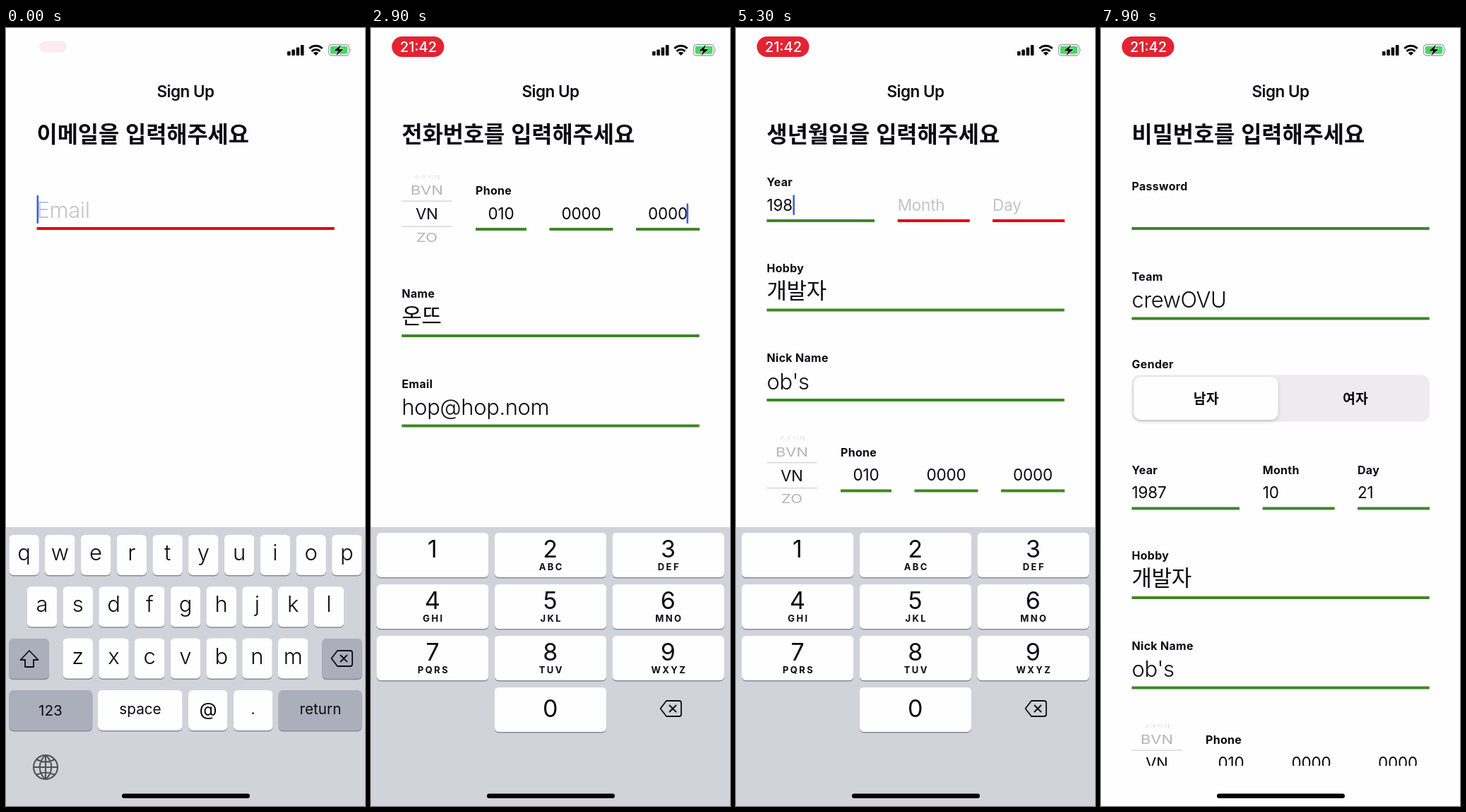
These frames come from a looping animation (508 px wide and 1102 px high, 8 s). An HTML page:

```html
<!DOCTYPE html>
<html lang="ko">
<head>
<meta charset="utf-8">
<title>Sign Up</title>
<style>
  html, body { margin: 0; width: 100%; height: 100%; overflow: hidden; background: #fefdff; }
  svg { display: block; width: 100vw; height: 100vh; }
  text { font-family: Inter, 'Noto Sans CJK KR', sans-serif; fill: #0c0b10; white-space: pre; }
  .mid { text-anchor: middle; }
  .nav { font-size: 22.5px; font-weight: 600; letter-spacing: -.5px; }
  .title { font: 700 31.7px 'Noto Sans CJK KR', sans-serif; }
  .label { font-size: 16px; font-weight: 700; letter-spacing: .3px; }
  .big { font-size: 31px; font-weight: 300; letter-spacing: -.4px; }
  .small { font-size: 22.5px; letter-spacing: -.2px; }
  .hint { fill: #c5c3c9; }
  .wheel { font-size: 22px; }
  .segment { font-size: 19.5px; font-weight: 600; }
  .key { font-size: 31px; font-weight: 300; }
  .pop { font-size: 44px; font-weight: 300; }
  .word { font-size: 20.7px; }
  .at { font-size: 26px; }
  .digit { font-size: 34px; }
  .abc { font-size: 13px; font-weight: 700; letter-spacing: 2.4px; }
  .clock { font-size: 20px; font-weight: 500; fill: #fff; }
  .icon { fill: none; stroke: #0c0b10; stroke-width: 1.8; stroke-linejoin: round; stroke-linecap: round; }
  .tool { fill: none; stroke: #50525a; stroke-width: 2.1; stroke-linecap: round; }
</style>
</head>
<body>
<svg viewBox="0 0 508 1102" preserveAspectRatio="none">
  <defs>
    <clipPath id="page"><rect width="508" height="1045"/></clipPath>
    <filter id="lift" x="-20%" y="-20%" width="140%" height="150%">
      <feDropShadow dx="0" dy="2" stdDeviation="2.5" flood-opacity=".2"/>
    </filter>
  </defs>
  <rect width="508" height="1102" fill="#fefdff"/>
  <g id="status">
    <g fill="#0c0b10">
      <rect x="398" y="33" width="4.6" height="6" rx="1"/>
      <rect x="404.3" y="30.5" width="4.6" height="8.5" rx="1"/>
      <rect x="410.6" y="27.5" width="4.6" height="11.5" rx="1"/>
      <rect x="416.9" y="24" width="4.6" height="15" rx="1"/>
      <path d="M438.5 39 l-3.8 -3.8 a5.4 5.4 0 0 1 7.6 0z"/>
    </g>
    <path d="M432.5 33 a8.5 8.5 0 0 1 12 0 M429.3 29 a13 13 0 0 1 18.4 0" fill="none" stroke="#0c0b10" stroke-width="3"/>
    <rect x="456.5" y="23.5" width="29" height="15.5" rx="4.5" fill="none" stroke="#a3a2a8" stroke-width="1.3"/>
    <rect x="458.7" y="25.7" width="24.6" height="11" rx="2.6" fill="#43d964"/>
    <path d="M487 28.5 q2 2.7 0 5.4z" fill="#a3a2a8"/>
    <path d="M474 23.5 L464 32.5 h6 L467 39.5 L477.5 30 h-6z" fill="#0c0b10" stroke="#fefdff" stroke-width="1" paint-order="stroke"/>
    <text class="nav mid" x="254" y="98">Sign Up</text>
  </g>
  <g id="scene"></g>
  <rect x="164" y="1084.5" width="181" height="6.5" rx="3.2" fill="#050406"/>
</svg>
<script>
const LOOP = 8000, TICK = 100, MOVE = 240, KEYBOARD_HEIGHT = 395;
const RED = '#e4000f', GREEN = '#3f8824', WHITE = '#fefdff', GREY = '#abafbc';

const clamp = (v, lo, hi) => Math.min(hi, Math.max(lo, v));
const ease = v => 1 - (1 - clamp(v, 0, 1)) ** 3;
const prefixes = s => [...s].map((_, i) => s.slice(0, i + 1));
const latest = (list, t) => list.filter(e => e[0] <= t).pop()[1];

// Each step adds a row on top; from `start` one state of `values` shows per tick.
const step = (at, title, label, height, start, values, keys = '') =>
  ({ at, title, label, height, start, values, keys });
const steps = [
  step(-1000, '이메일을', 'Email', 127.5, 100, [...prefixes('hop@hop.'), 'hop@hop.no', 'hop@hop.nom'], 'hop@hop.om'),
  step(1100, '이름을', 'Name', 127.5, 1200, ['오', '온', '온ㄸ', '온뜨'], ' ㄴㄷㅡ'),
  step(1600, '전화번호를', 'Phone', 152, 2100,
    ['0', '01', '010', '01000', '0100000', '010000000', '01000000000'], '0100000'),
  step(3000, '닉네임을', 'Nick Name', 127.5, 3300, ['o', 'ob', 'ob', "ob'", "ob's"], "ob 's"),
  step(3900, '취미를', 'Hobby', 127.5, 4200, ['ㄱ', '개', '갭', '개바', '개발', '개발ㅈ', '개발자'], 'ㄱㅐㅂㅏㄹㅈㅏ'),
  step(4900, '생년월일을', 'Year', 115.5, 5100, ['1', '19', '198', '198', '1987', '198710', '19871021'], '198 701'),
  step(5800, '성별을', 'Gender', 152.5, 5800, ['']),
  step(6000, '소속을', 'Team', 127.5, 6400, prefixes('crewOVU'), 'crewOVU'),
  step(7300, '비밀번호를', 'Password', 127.5, 7500, [' '])
];
const boards = [[0, 'email'], [1100, 'en'], [1200, 'ko'], [1600, 'pad'], [3000, 'ko'], [3200, 'en'],
  [3500, 'sym'], [3600, 'en'], [4100, 'ko'], [4900, 'pad'], [6000, 'en'], [6700, 'EN'], [7000, 'en']];
const letters = {
  en: ['qwertyuiop', 'asdfghjkl', 'zxcvbnm'],
  EN: ['QWERTYUIOP', 'ASDFGHJKL', 'ZXCVBNM'],
  ko: ['ㅂㅈㄷㄱㅅㅛㅕㅑㅐㅔ', 'ㅁㄴㅇㄹㅎㅗㅓㅏㅣ', 'ㅋㅌㅊㅍㅠㅜㅡ'],
  sym: ['1234567890', '-/:;()$&@"', ".,?!'"]
};

const text = (x, y, str, cls, attrs = '') =>
  `<text x="${x}" y="${y}" class="${cls}" ${attrs}>${str.replace('&', '&amp;')}</text>`;
const rect = (x, y, w, h, fill, rx = 0, attrs = '') =>
  `<rect x="${x}" y="${y}" width="${w}" height="${h}" rx="${rx}" fill="${fill}" ${attrs}/>`;
const cap = (x, y, w, h, fill) => rect(x, y + 1.5, w, h, '#898b92', 6) + rect(x, y, w, h, fill, 6);
const path = (d, cls, attrs = '') => `<path d="${d}" class="${cls}" ${attrs}/>`;

function valueAt(row, t) {
  const i = Math.round((t - row.start) / TICK);
  return i < 0 ? '' : row.values[Math.min(i, row.values.length - 1)];
}

function pressedKey(row, t) {
  return (t / TICK) % 2 ? row.keys[Math.round((t - row.start) / TICK) + 1] || '' : '';
}

function field(x0, x1, lineY, value, hint, focused, size = 'big', centred = false) {
  const shown = value || hint;
  const x = centred ? (x0 + x1) / 2 : x0;
  const drop = size === 'small' ? 14.5 : /[ㄱ-힣]/.test(value) ? 17 : 15.5;
  const cls = `${size}${centred ? ' mid' : ''}${value ? '' : ' hint'}`;
  const [top, tall] = size === 'big' ? [47, 40] : [36.5, 28.5];
  return rect(x0, lineY - 2, x1 - x0, 4, value ? GREEN : RED) +
    text(x, lineY - drop, shown, cls, focused ? 'id="focus"' : '') +
    (focused ? rect(x0, lineY - top, 2.6, tall, '#3c62d6', 1, 'id="caret"') : '');
}

function wheel(t) {
  const turn = 2 * ease((t - 2640) / 300);
  const items = ['선택', 'BVN', 'VN', 'ZO'].map((name, i) => {
    const d = i - turn, angle = .66 * d;
    if (Math.abs(d) > 2.1) return '';
    const place = `transform="translate(79 ${263 + 54 * Math.sin(angle)}) scale(1 ${Math.cos(angle)})"`;
    const opacity = Math.abs(d) < .5 ? 1 : Math.abs(d) < 1.5 ? .3 : .1;
    return text(0, 8, name, 'wheel mid', `${place} opacity="${opacity}"`);
  });
  return items.join('') + rect(43.5, 244.5, 71.5, 1.3, '#d3d2d7') + rect(43.5, 280.5, 71.5, 1.3, '#d3d2d7');
}

function rowBody(row, t, active) {
  const v = valueAt(row, t), n = v.length;
  const label = (x, y, str, on) => on ? text(x, y, str, 'label') : '';
  if (row.label === 'Phone') {
    const part = n < 3 ? 0 : n < 7 ? 1 : 2;
    return wheel(t) + label(148, 236, 'Phone', n) +
      field(148, 220, 285, v.slice(0, 3), 'Phone', active && part === 0, 'small', true) +
      field(252.5, 342.5, 285, v.slice(3, 7), '', active && part === 1, 'small', true) +
      field(375, 465, 285, v.slice(7), '', active && part === 2, 'small', true);
  }
  if (row.label === 'Year') {
    const part = n < 4 ? 0 : n < 6 ? 1 : 2;
    return [['Year', 43.5, 196, 0, 4], ['Month', 228.7, 330.7, 4, 6], ['Day', 363, 465, 6, 8]]
      .map(([name, x0, x1, from, to], i) => label(x0, 224, name, n > from) +
        field(x0, x1, 273, v.slice(from, to), name, active && part === i, 'small')).join('');
  }
  if (row.label === 'Gender') {
    return label(43.5, 226.5, 'Gender', true) + rect(43.5, 236.5, 421.5, 66, '#eeebee', 12) +
      rect(46.5, 239, 204, 61, WHITE, 10, 'filter="url(#lift)"') +
      text(148.7, 276.5, '남자', 'segment mid') + text(360, 276.5, '여자', 'segment mid');
  }
  return label(43.5, 230, row.label, n) +
    field(43.5, 464.7, 284, v, row.label, active && row.label !== 'Password');
}

function form(t) {
  let y = 0, out = '';
  const shown = steps.filter(s => s.at <= t);
  const current = shown[shown.length - 1];
  for (const row of shown.reverse()) {
    const enter = ease((t - row.at) / MOVE);
    out += `<g transform="translate(0 ${y})" opacity="${enter}">${rowBody(row, t, row === current)}</g>`;
    y += row.height * enter;
  }
  return text(43.5, 162, current.title + ' 입력해주세요', 'title') + `<g clip-path="url(#page)">${out}</g>`;
}

function backspace(dx, dy) {
  return path('M469 882 H487 q3 0 3 3 V901 q0 3 -3 3 H469 L460.5 893Z M473.5 888.5 l9 9 m0 -9 l-9 9',
    'icon', `transform="translate(${dx} ${dy})"`);
}

function popup(x, y, w, ch) {
  const bx = clamp(x + w / 2 - 36, 3, 433), bottom = y + 57;
  const d = `M${bx + 10} ${y - 74} h52 q10 0 10 10 v42 C${bx + 72} ${y - 8} ${x + w} ${y - 8} ${x + w} ${y + 6}
    V${bottom - 6} q0 6 -6 6 H${x + 6} q-6 0 -6 -6 V${y + 6} C${x} ${y - 8} ${bx} ${y - 8} ${bx} ${y - 22} v-42 q0 -10 10 -10z`;
  return path(d, '', `fill="${WHITE}" filter="url(#lift)"`) + text(bx + 36, y - 25, ch, 'pop mid');
}

function pad(pressed) {
  const groups = ['', 'ABC', 'DEF', 'GHI', 'JKL', 'MNO', 'PQRS', 'TUV', 'WXYZ'];
  const key = (n, col, r, sub) => {
    const x = 8 + col * 166.7, y = 715 + r * 73;
    return cap(x, y, 158.5, 63, pressed === String(n) ? GREY : WHITE) +
      text(x + 79, y + (n ? 35 : 42), String(n), 'digit mid') + text(x + 80.5, y + 53, sub, 'abc mid');
  };
  return groups.map((sub, i) => key(i + 1, i % 3, Math.floor(i / 3), sub)).join('') +
    key(0, 1, 3, '') + backspace(-51, 71);
}

function letterBoard(name, pressed) {
  let out = '', bubble = '';
  (letters[name] || letters.en).forEach((row, r) => {
    const wide = row.length === 5, pitch = wide ? 71 : 50.75, w = wide ? 62.5 : 42.5;
    const left = 254 - row.length * pitch / 2 + 4.1, y = 718 + r * 73.3;
    [...row].forEach((ch, i) => {
      const x = left + i * pitch;
      out += cap(x, y, w, 57, WHITE) + text(x + w / 2, y + 36, ch, 'key mid');
      if (ch === pressed) bubble = popup(x, y, w, ch);
    });
  });
  const upper = name === 'EN', hit = ch => pressed === ch ? '#989ba8' : WHITE;
  out += cap(4.3, 864.7, 56.5, 57, upper ? WHITE : GREY) + cap(447.3, 864.7, 56.5, 57, GREY) + backspace(0, 0);
  out += name === 'sym' ? text(32.5, 900, '#+=', 'word mid')
    : path('M33 882 L45.5 895 H39 V905 H27 V895 H20.5Z', 'icon', upper ? 'style="fill:#0c0b10"' : '');
  out += cap(4.3, 938, 118, 57, GREY) + text(63, 974, name === 'sym' ? 'ABC' : '123', 'word mid') +
    cap(385.7, 938, 118, 57, GREY) + text(445, 972, 'return', 'word mid');
  if (name === 'email') {
    out += cap(130, 938, 119.7, 57, WHITE) + text(190, 972, 'space', 'word mid') +
      cap(258, 938, 55.5, 57, hit('@')) + text(286, 974, '@', 'at mid') +
      cap(322, 938, 55.5, 57, hit('.')) + text(349.5, 972, '.', 'word mid');
  } else {
    out += cap(130, 938, 247, 57, WHITE) + text(253.5, 972, name === 'ko' ? '스페이스' : 'space', 'word mid') +
      path('M446.5 1034 a6.5 6.5 0 0 1 13 0 v12 a6.5 6.5 0 0 1 -13 0z M441 1043 v3 a12 12 0 0 0 24 0 v-3 M453 1058 v7 M445 1065 h16', 'tool');
  }
  out += path(`M39 1047 a17 17 0 1 0 34 0 a17 17 0 1 0 -34 0z M56 1030 v34 M39 1047 h34
    M56 1030 c-11 9 -11 25 0 34 c11 -9 11 -25 0 -34 M43 1036 q13 7 26 0 M43 1058 q13 -7 26 0`, 'tool');
  return out + bubble;
}

function keyboard(t) {
  const slide = at => ease((t - at) / MOVE);
  const hidden = t < 5800 ? 0 : t < 6000 ? slide(5800) : t < 7300 ? 1 - slide(6000) : slide(7300);
  if (hidden === 1) return '';
  const name = latest(boards, t);
  const pressed = pressedKey(steps.filter(s => s.at <= t).pop(), t);
  return `<g transform="translate(0 ${hidden * KEYBOARD_HEIGHT})">` +
    rect(0, 707, 508, KEYBOARD_HEIGHT, '#d1d3db') +
    (name === 'pad' ? pad(pressed) : letterBoard(name, pressed)) + '</g>';
}

function recordPill(t) {
  const grow = ease(t / 200), scale = .53 + .47 * grow;
  const mark = t < 1200
    ? '<circle cx="66.5" cy="26.5" r="9.8" fill="none" stroke="#fff" stroke-width="2.1"/><circle cx="66.5" cy="26.5" r="6" fill="#fff"/>'
    : text(67, 33.5, t < 2900 ? '21:41' : '21:42', 'clock mid');
  return `<g opacity="${.08 + .92 * grow}" transform="translate(66.5 26.5) scale(${scale}) translate(-66.5 -26.5)">` +
    rect(29.5, 12, 74, 29, '#e32332', 14.5) + (t ? mark : '') + '</g>';
}

const scene = document.getElementById('scene');

function placeCaret() {
  const caret = document.getElementById('caret');
  if (!caret) return;
  const label = document.getElementById('focus');
  const width = label.getComputedTextLength(), x = +label.getAttribute('x');
  const left = label.classList.contains('mid') ? x - width / 2 - 2 : x;
  caret.setAttribute('x', label.classList.contains('hint') ? left : left + width + .5);
}

let drawn = -1;
function render(now) {
  const t = Math.floor((now % LOOP) / TICK) * TICK;
  if (t === drawn) return;
  drawn = t;
  scene.innerHTML = recordPill(t) + form(t) + keyboard(t);
  placeCaret();
}

const begin = performance.now();
function loop() {
  render(performance.now() - begin);
  requestAnimationFrame(loop);
}
loop();
</script>
</body>
</html>
```
